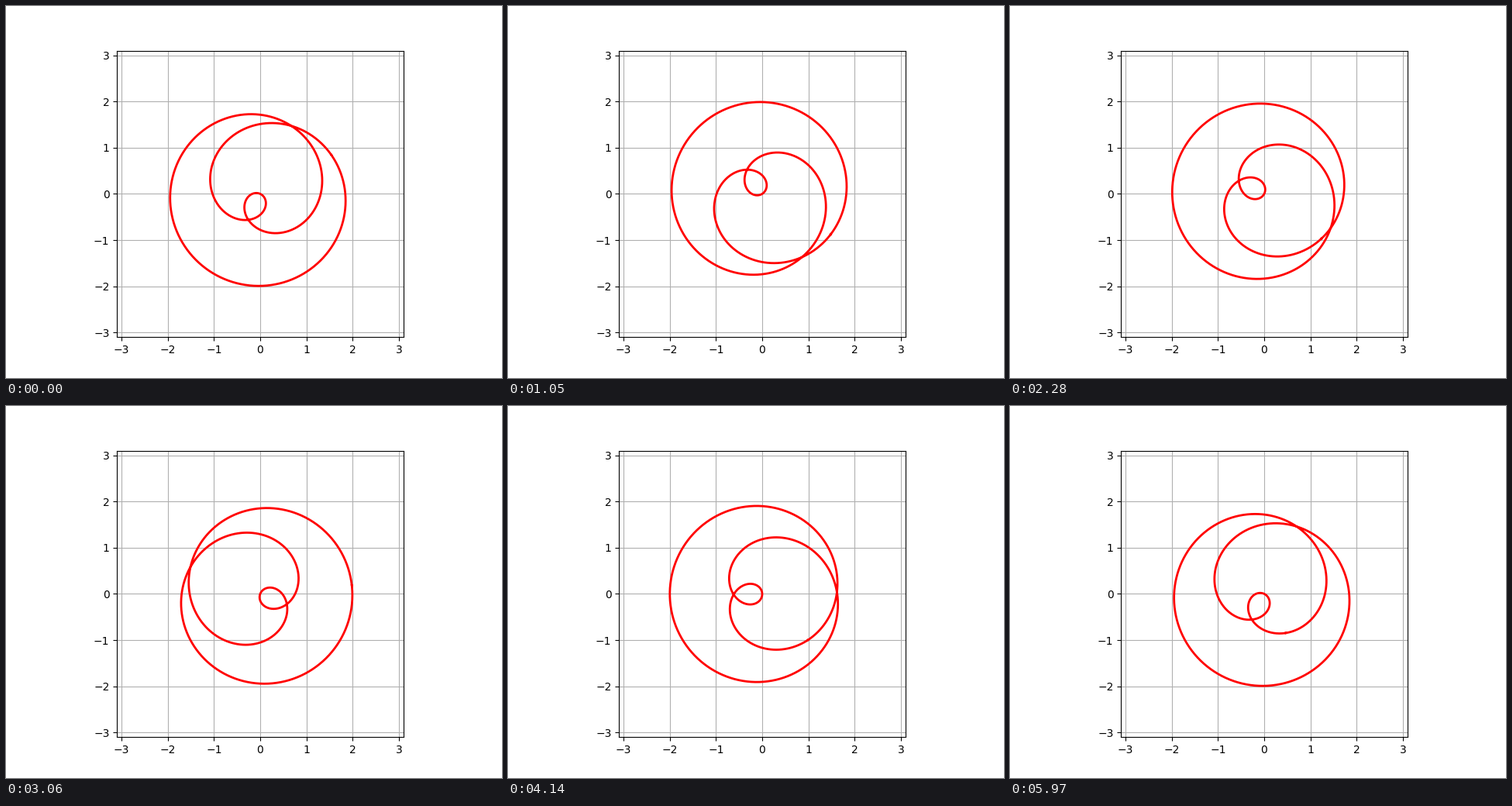
Write a matplotlib script that moves like this. It is 640 px wide and 480 px high and loops after 6 s.

```python
import numpy as np
import matplotlib.pyplot as plt
from matplotlib.animation import FuncAnimation

FRAMES = 200
INTERVAL = 30  # ms
LIMIT = 3.1

u = np.linspace(0, 2 * np.pi, 1000)

fig, ax = plt.subplots(figsize=(6.4, 4.8), dpi=100)
ax.set_aspect("equal")
ax.set_xlim(-LIMIT, LIMIT)
ax.set_ylim(-LIMIT, LIMIT)
ax.grid(True)
line, = ax.plot([], [], color="red", lw=2)


def curve(phase):
    """Sum of two unit rotations at speeds 2 and 3."""
    z = np.exp(2j * u) + np.exp(1j * (3 * u + phase))
    return z.real, z.imag


def update(i):
    line.set_data(*curve(1 + 0.3 * i))
    return line,


anim = FuncAnimation(fig, update, frames=FRAMES, interval=INTERVAL,
                     repeat=True, repeat_delay=0)
plt.show()
```
